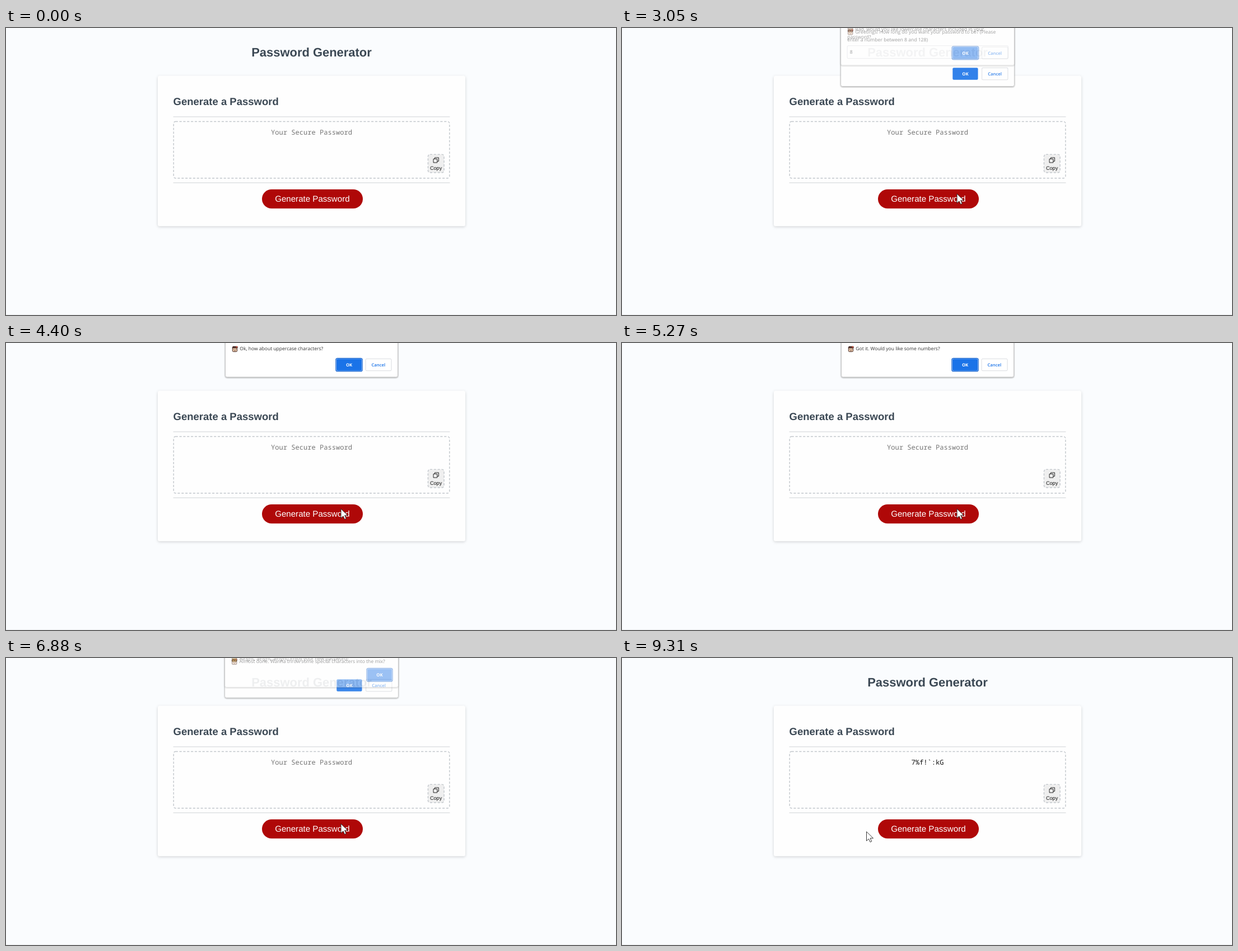
Write an HTML page that moves like this. It is 1089x514 px and loops after 9.38 s.

```html
<!DOCTYPE html>
<html lang="en">
<head>
<meta charset="utf-8">
<title>Password Generator</title>
<style>
  html, body { margin: 0; width: 100%; height: 100%; overflow: hidden; background: #fafcfe; }
  svg { display: block; width: 100vw; height: 100vh; text-rendering: geometricPrecision; }
  text { font-family: "Liberation Sans", Arial, sans-serif; white-space: pre; }
  .heading { font-weight: bold; fill: #3b4854; }
  .mono { font: 12.08px "Noto Sans Mono", "DejaVu Sans Mono", monospace; }
  .dashed { stroke: #c1c6cb; stroke-width: 1.37; stroke-dasharray: 4.1 2.75; }
  .dialog text { font: 8.54px "Open Sans", "Noto Sans", sans-serif; fill: #333; }
  .dialog .label { font-size: 7.7px; font-weight: 600; text-anchor: middle; }
  .dialog .primary { fill: #fff; font-weight: 700; }
  .dialog .secondary { fill: #1a73e8; }
</style>
</head>
<body>
<svg viewBox="0 0 1089 514">
  <defs>
    <filter id="cardShadow" x="-5%" y="-5%" width="110%" height="115%">
      <feDropShadow dx="0" dy="1.4" stdDeviation="2.75" flood-opacity=".17"/>
    </filter>
    <filter id="dialogShadow" x="-5%" y="-5%" width="110%" height="115%">
      <feDropShadow dx="0" dy="1" stdDeviation="1.1" flood-opacity=".4"/>
    </filter>
  </defs>

  <rect width="1089" height="514" fill="#fafcfe"/>
  <rect y="513" width="1089" height="1" fill="#eceef0"/>
  <text class="heading" x="545.5" y="51.3" font-size="21.95" text-anchor="middle">Password Generator</text>

  <rect x="271" y="85.7" width="549" height="269" rx="3.5" fill="#fefefe" filter="url(#cardShadow)"/>
  <text class="heading" x="298.5" y="137.7" font-size="18.53">Generate a Password</text>
  <path d="M298.5 159H792.5M298.5 277.3H792.5" stroke="#dfe1e3" stroke-width="1.4"/>
  <rect class="dashed" x="299.2" y="167.5" width="492.6" height="101.5" rx="3.5" fill="none"/>
  <text id="password" class="mono" x="545.5" y="191" text-anchor="middle"></text>

  <rect class="dashed" x="753.4" y="226.4" width="28.6" height="32.6" rx="3.5" fill="#efefef"/>
  <path d="M763 234.5h6.8v6.6h-6.8zM765.4 234.5v-2.4h7v6.6h-2.6" fill="none" stroke="#222"/>
  <text x="767.6" y="253.5" font-size="9.15" text-anchor="middle" fill="#111">Copy</text>

  <rect x="457" y="289" width="180" height="34.3" rx="17.15" fill="#af0808"/>
  <text x="546.9" y="311.2" font-size="15.1" text-anchor="middle" fill="#fff">Generate Password</text>

  <g id="dialogs"></g>
  <path id="cursor" d="M0 0V16.5L4 13 6.6 18.7 9.2 17.5 6.7 11.8H12Z" fill="#fff" stroke="#222" stroke-width=".9"/>
</svg>

<script>
const LOOP = 9380;

// The screen only refreshes in these bursts: [first, last, number of refreshes].
const bursts = [
  [520, 710, 4], [910, 1450, 9], [1780, 1780, 1], [2320, 2450, 2], [2980, 3190, 4], [4200, 4400, 4],
  [5060, 5270, 4], [5870, 6080, 4], [6740, 6960, 4], [7690, 7900, 4], [8890, 9310, 7]
];

// `opened` is when a dialog has settled, `closing` when it starts to leave.
const dialogs = [
  { kind: "prompt", opened: 1450, closing: 3034, bottom: 107.5, buttonY: 85, hat: "#5a4038",
    lines: ["Greetings! How long do you want your password to be? (Please", "enter a number between 8 and 128)"] },
  { kind: "confirm", opened: 3190, closing: 4251, bottom: 75, buttonY: 53, hat: "#5a4038",
    lines: ["Rad, would you like lowercase characters included in your", "password?"] },
  { kind: "confirm", opened: 4400, closing: 5111, bottom: 61, buttonY: 39, hat: "#4a2f2a",
    lines: ["Ok, how about uppercase characters?"] },
  { kind: "confirm", opened: 5270, closing: 5921, bottom: 61, buttonY: 39, hat: "#4a2f2a",
    lines: ["Got it. Would you like some numbers?"] },
  { kind: "confirm", opened: 6080, closing: 6791, bottom: 75, buttonY: 53, hat: "#4a2f2a",
    lines: ["Almost done. Wanna throw some special characters into the mix?"] },
  { kind: "alert", opened: 6960, closing: 7682, bottom: 61, buttonY: 39, hat: "#4a3a20", face: "#f0bd55",
    lines: ["Alright, alright, alright! Enjoy your new password!"] }
];

const byId = id => document.getElementById(id);
const clamp = v => Math.max(0, Math.min(1, v));
const progress = (t, from, to) => clamp((t - from) / (to - from));
const mix = (a, b, p) => a + (b - a) * p;
const easeOut = p => 1 - (1 - p) ** 2;
const easeInOut = p => p * p * (3 - 2 * p);

function refreshTime(t) {
  let shown = 0;
  for (const [first, last, count] of bursts) {
    if (t < first) break;
    const step = (last - first) / (count - 1) || 1;
    shown = first + Math.min(count - 1, Math.floor((t - first) / step + 1e-6)) * step;
  }
  return shown;
}

function primaryButton(x, y, width) {
  return `<rect class="ring" x="${x - 1.2}" y="${y - 11.7}" width="${width + 2.4}" height="23.4" rx="3"
      fill="#fff" stroke="#1a66d0" stroke-width="1.3"/>
    <rect x="${x}" y="${y - 10.7}" width="${width}" height="21.4" rx="2" fill="#1a73e8"/>
    <text class="label primary" x="${x + width / 2}" y="${y + 2.8}">OK</text>`;
}

function secondaryButton(y) {
  return `<rect x="642" y="${y - 10.7}" width="46" height="21.4" rx="2" fill="#fff" stroke="#dadce0"/>
    <text class="label secondary" x="664.8" y="${y + 2.8}">Cancel</text>`;
}

function face(hat, skin = "#e6c3a5") {
  return `<rect x="404.3" y="8.2" width="8.4" height="7.4" rx="2" fill="${skin}" stroke="${hat}"/>
    <path d="M403.3 9.3 405 5.8h7.5l1.6 1.2-1 2.6z" fill="${hat}"/>
    <circle cx="411.7" cy="7" r="1.3" fill="#d0503c"/>
    <path d="M406.3 11.5h1.3M409.8 11.5h1.3M407.3 13.7h2.7" stroke="${hat}" stroke-width=".8"/>`;
}

const promptField = `<rect class="field" x="403" y="35.2" width="285.5" height="22.6" rx="2" fill="#fff"/>
  <text class="typed" x="407.6" y="49.6">8</text>
  <rect class="caret" y="41" width="1" height="11" fill="#333"/>`;

function buildDialog({ kind, bottom, buttonY, hat, face: skin, lines }) {
  const node = document.createElementNS("http://www.w3.org/2000/svg", "g");
  node.setAttribute("class", "dialog");
  const text = lines.map((line, i) => `<text x="${i ? 403 : 417.3}" y="${13.4 + i * 13.7}">${line}</text>`).join("");
  node.innerHTML = `<rect x="391.5" y="-40" width="308" height="${bottom + 40}" rx="3" fill="#fff"
      stroke="#bbb" stroke-width=".8" filter="url(#dialogShadow)"/>` +
    face(hat, skin) + text + (kind === "prompt" ? promptField : "") +
    (kind === "alert" ? primaryButton(644.5, buttonY, 43.5) : primaryButton(590, buttonY, 45) + secondaryButton(buttonY));
  byId("dialogs").append(node);
  return node;
}

for (const dialog of dialogs) dialog.node = buildDialog(dialog);

const show = (node, visible) => node.setAttribute("visibility", visible ? "inherit" : "hidden");

function drawDialog({ node, kind, opened, closing }, t) {
  const entering = progress(t, opened - 225, opened - 44);
  const leaving = progress(t, closing, closing + 148);
  const opacity = entering * (1 - leaving);
  const lift = leaving ? 11 * Math.sqrt(leaving) : 13 * (1 - entering) ** 0.65;
  const scale = lift ? 1.006 : 1;
  show(node, opacity > 0);
  node.setAttribute("opacity", opacity);
  node.setAttribute("transform", `translate(${545.5 * (1 - scale)} ${-lift}) scale(${scale})`);
  show(node.querySelector(".ring"), kind !== "prompt" && !leaving);
}

function drawPromptField(node, t) {
  const focused = t < 2980;
  const typed = t >= 2450;
  const field = node.querySelector(".field");
  field.setAttribute("stroke", focused ? "#4c8df0" : "#dadce0");
  field.setAttribute("stroke-width", focused ? 1.6 : 1);
  show(node.querySelector(".typed"), typed);
  const caret = node.querySelector(".caret");
  caret.setAttribute("x", typed ? 413 : 408);
  show(caret, focused && (t < 1780 || t >= 2320));
}

function cursorPosition(t) {
  if (t < 910) {
    const p = easeOut(progress(t, 520, 710));
    return [mix(1010, 685, p), mix(489, 313, p)];
  }
  if (t < 8890) {
    const p = easeOut(progress(t, 843, 1180));
    return [mix(685, 598, p), mix(313, 297, p)];
  }
  const p = easeInOut(progress(t, 8820, 9310));
  return [mix(598, 436.5, p), mix(297, 311, p) + 6 * Math.sin(Math.PI * p)];
}

function draw(t) {
  const done = t >= 7690;
  const password = byId("password");
  password.textContent = done ? "7%f!`:kG" : "Your Secure Password";
  password.setAttribute("fill", done ? "#111" : "#757575");
  for (const dialog of dialogs) drawDialog(dialog, t);
  drawPromptField(dialogs[0].node, t);
  const cursor = byId("cursor");
  show(cursor, t >= 520);
  cursor.setAttribute("transform", `translate(${cursorPosition(t)})`);
}

const start = performance.now();
function tick() {
  draw(refreshTime((performance.now() - start) % LOOP));
  requestAnimationFrame(tick);
}
tick();
</script>
</body>
</html>
```
